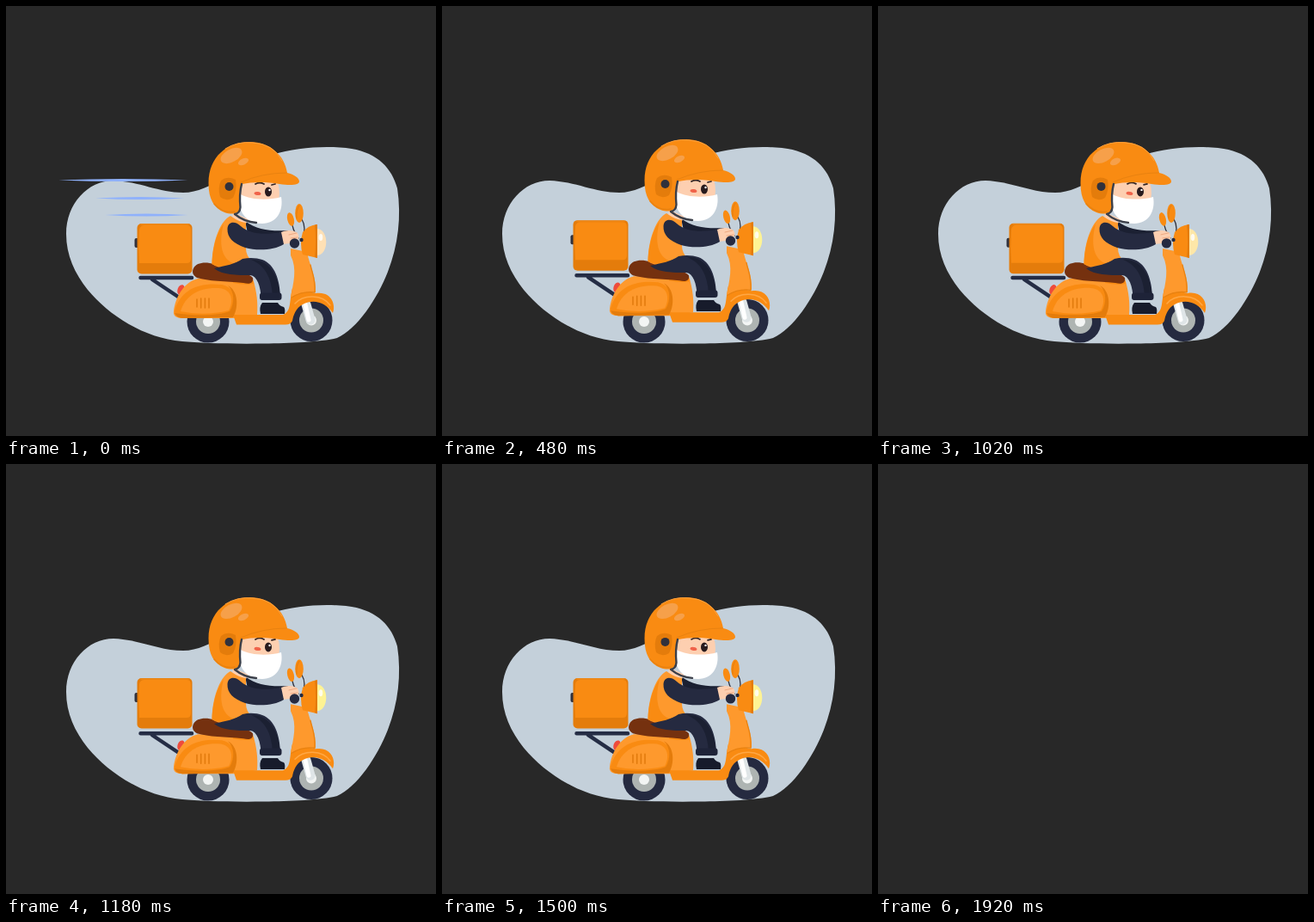
Write an HTML page that moves like this. It is 500 px wide and 500 px high and loops after 1940 ms.

```html
<!DOCTYPE html>
<html lang="en">
<head>
<meta charset="utf-8">
<title>Scooter delivery</title>
<style>
  html, body { margin: 0; width: 100%; height: 100%; overflow: hidden; background: #282828; }
  svg { display: block; width: 100vw; height: 100vh; }
  .o { fill: #f98b12; }
  .b { fill: #fe992d; }
  .d { fill: #e47c0b; }
  .n { fill: #252a40; }
  .skin { fill: #fdcfb0; }
  .line { fill: none; stroke-linecap: round; stroke-linejoin: round; }
</style>
</head>
<body>
<svg viewBox="0 0 500 500">
  <g id="scene">
    <path fill="#c4d0da" d="M70 265C70 230 95 203 125 203C155 204 178 217 206 217C240 217 265 185 310 173C338 164 375 162 402 166C432 171 449 189 455 212C460 245 456 278 444 309C432 340 408 376 385 386C365 391 330 392 300 392.500C260 393 225 392 205 390C160 386 120 360 95 330C80 311 70 290 70 265Z"/>
    <g id="streaks" fill="#8fb1fb"></g>

    <g id="wheels"></g>

    <g id="bike">
      <path class="line" d="M349 347L354 365" stroke="#dfe5e7" stroke-width="11"/>
      <path class="line" d="M348 347L352 365" stroke="#fff" stroke-width="5"/>
      <path class="line" d="M156.500 316H216M170 318L200 338" stroke="#252d45" stroke-width="4.500"/>
      <ellipse cx="203.500" cy="330" rx="4" ry="6" fill="#ee4b3c" transform="rotate(20 203.500 330)"/>

      <path class="b" d="M195 355C197 338 207 321 223 317L287 317C292 333 293 346 292 359L264 363H205C198 363 194 360 195 355Z"/>
      <path class="o" d="M264 359H322C332 355 329 345 333 328L360 334C378 331 384 347 380 357C372 345 358 340 345 347C337 351 334 360 333 366Q331 370.500 325 370.500H268Z"/>
      <path class="b" d="M331 282L350 286C353 302 361 315 360 333Q345 331 331 339C334 322 339 306 331 290Z"/>
      <path class="line" d="M354 301C356 311 360 317 359 333Q345 331 332 339" stroke="#e98210" stroke-width="1.300"/>
      <path class="line" d="M336 346C346 335 368 335 377 348" stroke="#ffa744" stroke-width="1.500"/>
      <path class="o" d="M196 354C203 331 222 321 251 324C266 327 270 342 264 362L205 363Q195 362 196 354Z"/>
      <path class="b" d="M203 355C208 337 224 327 247 328C263 329 265 343 259 354Q230 361 203 355Z"/>
      <path class="d" d="M196 357C220 361 248 360 260 355C266 346 266 332 258 325C270 331 271 350 264 362L205 363Q198 362 196 357Z"/>
      <path class="line" d="M222 341V350M226.700 340V351M231.400 340V351M236 340V351" stroke="#e17a0c" stroke-width="1.500"/>
      <path class="o" d="M264 319H287L288 323Q278 325 264 322Z"/>
      <path fill="#75310f" d="M218 305C221 298 232 297 242 300C256 307 280 308 287 316C288 322 284 324 276 322C255 320 235 320 222 316C217 313 216 309 218 305Z"/>

      <path class="line" d="M333 255Q335 264 340 270M344 248Q350 258 344 272" stroke="#30313c" stroke-width="1.300"/>
      <ellipse class="o" cx="331" cy="248" rx="3.800" ry="8" transform="rotate(-14 331 248)"/>
      <ellipse class="o" cx="341" cy="241" rx="4.800" ry="11"/>
      <path class="line" d="M338 247Q337 237 341 232" stroke="#e47c0b" stroke-width="1"/>
      <path id="lens" d="M361 259C376 259 376 290 361 290Z"/>
      <ellipse cx="366" cy="269" rx="2.300" ry="4" fill="#fff" opacity=".8"/>
      <path class="o" d="M345 263Q351 255 362 254V293L345 289Q341 276 345 263Z"/>
      <path class="d" d="M359 254.500L362 254V293L359 292Q361 274 359 254.500Z"/>
    </g>

    <g id="box">
      <rect x="149.500" y="270" width="6" height="11" rx="2" fill="#30313c"/>
      <rect class="d" x="152.500" y="253" width="64" height="58.500" rx="5"/>
      <path class="o" d="M155 299Q153.500 280 155 260Q156 255 161 255H210Q215 255 215 260V294Q215 299 210 299Z"/>
      <path class="line" d="M157 254H212" stroke="#f28a19" stroke-width="1.300"/>
    </g>

    <g id="rider">
      <path fill="#1b2032" d="M278 250C292 261 309 262 328 261L326 269L282 269Z"/>
      <path class="skin" d="M264 240L282 248L277 256L263 248Z"/>
      <path class="b" d="M261 244C250 249 240 272 239.500 300C249 307 269 306 286 297Q279 290 279 282L279 252Q271 251 264 246Z"/>
      <path class="o" d="M253 253C243 267 240 285 239.500 300Q254 307 275 301C252 301 246 281 253 253Z"/>
      <path class="n" d="M242 305C255 302 267 300 275 294C284 292 292 293 298 295C312 300 319 318 319 341L297 342C296 325 292 314 284 313C268 313 252 313 242 305Z"/>
      <path fill="#1b2032" d="M285 295C304 294 318 311 319 341H310C310 320 303 302 285 295Z"/>
      <rect x="295" y="333.500" width="25.500" height="8.500" rx="3" fill="#1e2338"/>
      <path fill="#171b2b" d="M298 345H316Q318 349 323 350Q325 352 324 358H296Q294 350 298 345Z"/>
      <path class="skin" d="M318 264C325 260 334 260 339 264C343 270 338 276 330 276L321 277Z"/>
      <path class="line" d="M329 266L338 264M331 270L339 269" stroke="#eda982" stroke-width="1"/>
      <path class="n" d="M257.500 259C258 250 267 250 273 256C284 266 302 266 320 263L323 277C312 284 292 285 278 281C264 276 257 269 257.500 259Z"/>
      <circle class="n" cx="335.500" cy="276" r="5.700"/>
      <circle class="n" cx="343.500" cy="272" r="2.200"/>

      <path class="skin" d="M272 203H315Q319 211 317.500 224L300 232H272Z"/>
      <path class="line" d="M290 207Q295 204 300 207M309 208L313 207" stroke="#302322" stroke-width="1.800"/>
      <ellipse cx="305" cy="216" rx="4" ry="5.500" fill="#281b1e"/>
      <circle cx="306.500" cy="214" r="1.200" fill="#fff"/>
      <ellipse cx="292.500" cy="218" rx="4" ry="2" fill="#f06249" transform="rotate(8 292.500 218)"/>
      <path fill="#fff" d="M273 219C285 226 306 226 320 222C323 239 314 253 298 253C284 253 274 245 272 233Z"/>
      <path class="o" d="M235.500 206C235.500 175 257 158 284 158C306 158 324 173 327 194C335 196 341 200 341 204C341 208 332 209 318 207C300 204 285 205 275 207C271 217 273 225 272 235C272 242 262 243 254 240C242 235 235.500 225 235.500 206Z"/>
      <path class="d" d="M249 222Q246 211 250 203Q257 197 267 202Q269 214 264 223Q256 228 249 222Z"/>
      <path class="line" d="M274 207Q271 219 272.500 234Q272 241 266 242Q277 251 291 252" stroke="#3b3f49" stroke-width="2.400"/>
      <path class="line" d="M242 230Q253 242 266 239" stroke="#e98210" stroke-width="1.500"/>
      <path class="line" d="M273 205Q298 194 326 194" stroke="#e98210" stroke-width="1"/>
      <path class="line" d="M255 166Q269 157 287 159Q311 160 321 180" stroke="#fda03c" stroke-width="1"/>
      <g fill="#f6a04a">
        <ellipse cx="262" cy="174" rx="13.500" ry="7.500" transform="rotate(-28 262 174)"/>
        <ellipse cx="276" cy="181" rx="6.500" ry="3.600" transform="rotate(-25 276 181)"/>
      </g>
      <circle cx="259.500" cy="210" r="5" fill="#30313c"/>
    </g>
  </g>
</svg>
<script>
const LOOP = 1940, VISIBLE = 1920, BOUNCE = 1000 / 3, STREAK_TIME = 200;
const $ = id => document.getElementById(id);
const streaks = [[61, 212, 202.5], [104, 208, 223.5], [115, 212, 243]];

$("wheels").innerHTML = [[235, 367], [355, 365.5]].map(([x, y]) => `
  <circle class="n" cx="${x}" cy="${y}" r="24.5"/>
  <circle cx="${x}" cy="${y}" r="14" fill="#aeb4b2"/>
  <circle cx="${x}" cy="${y}" r="6" fill="#f3f5f4"/>`).join("");

function mix(from, to, k) {
  return `rgb(${from.map((v, i) => Math.round(v + (to[i] - v) * k))})`;
}

function lift(id, height) {
  $(id).setAttribute("transform", `translate(0 ${-height})`);
}

// Slim lens shape that withdraws towards its left end.
function streakPath([left, right, y], length) {
  const end = left + (right - left) * length;
  const mid = (left + end) / 2;
  return `<path d="M${left} ${y}Q${mid} ${y - 3} ${end} ${y}Q${mid} ${y + 3} ${left} ${y}Z"/>`;
}

function render(t) {
  const wave = Math.sin(Math.PI * (t % BOUNCE) / BOUNCE);
  const rise = wave * wave;
  lift("bike", 2.8 * rise);
  lift("rider", 3.1 * rise);
  lift("box", 4 * rise);
  $("lens").setAttribute("fill", mix([254, 222, 184], [254, 243, 148], Math.sqrt(wave)));

  const length = Math.max(0, 1 - t / STREAK_TIME);
  $("streaks").innerHTML = length ? streaks.map(s => streakPath(s, length)).join("") : "";
  $("scene").style.visibility = t < VISIBLE ? "visible" : "hidden";
}

const start = performance.now();
function tick() {
  render((performance.now() - start) % LOOP);
  requestAnimationFrame(tick);
}
tick();
</script>
</body>
</html>
```
